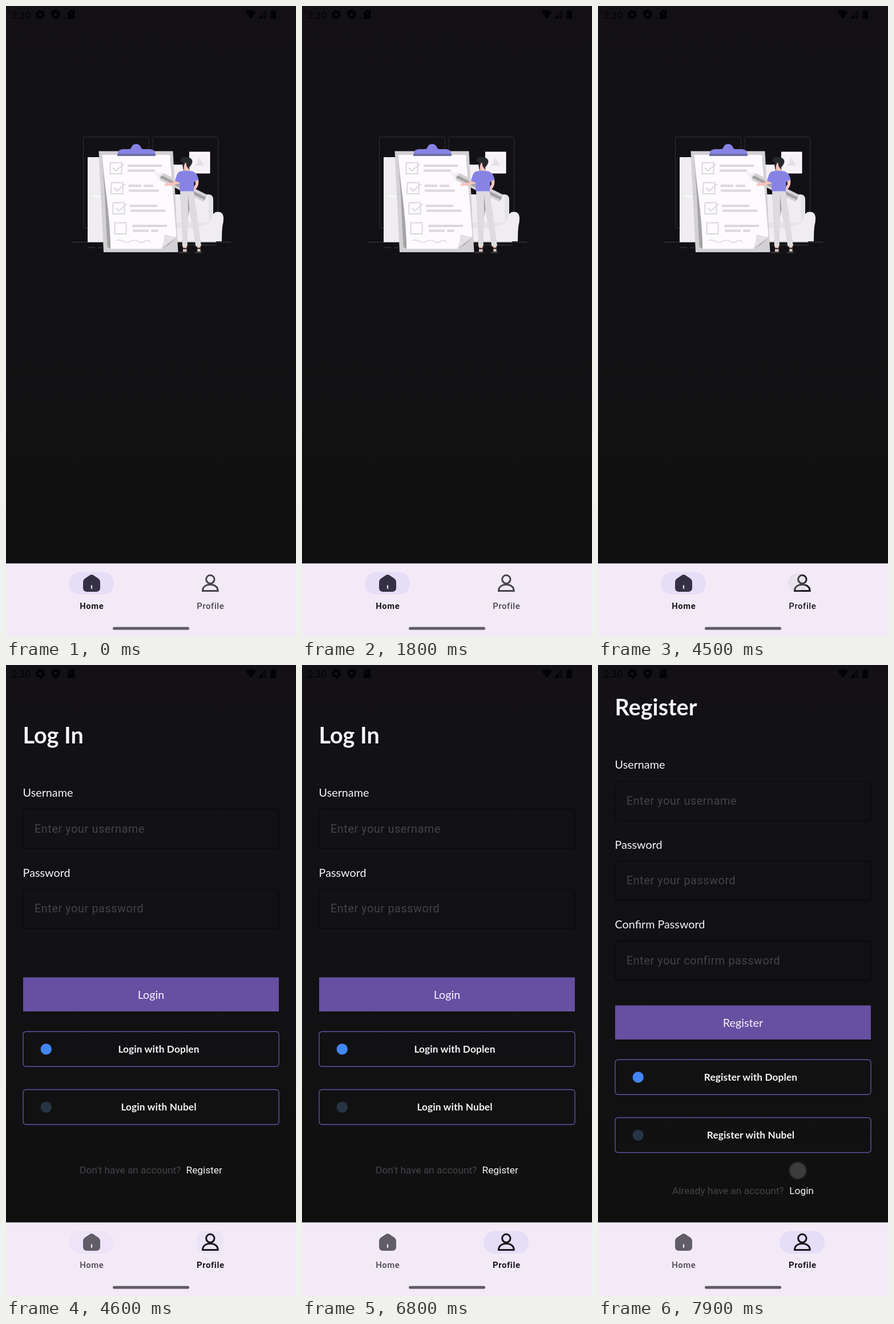
Recreate the animation shown at these times as an HTML page. Size 508 px wide and 1102 px high, loop 8000 ms.

```html
<!DOCTYPE html>
<html lang="en">
<head>
<meta charset="utf-8">
<title>Sign-in flow</title>
<style>
html, body { margin: 0; width: 100%; height: 100%; overflow: hidden; background: #111013; }
svg { display: block; width: 508px; height: 1102px; }
.lato { font-family: Lato, sans-serif; }
.roboto { font-family: Roboto, sans-serif; }
.title { font-size: 39.5px; font-weight: 700; }
.label, .main { font-size: 19.75px; }
.hint { font-size: 19.75px; letter-spacing: .617px; }
.social { font-size: 17.28px; font-weight: 700; letter-spacing: .12px; }
.foot { font-size: 17.28px; }
.tab { font-size: 14.8px; font-weight: 500; letter-spacing: .62px; }
.mid { text-anchor: middle; }
</style>
</head>
<body>
<svg viewBox="0 0 508 1102">
  <defs>
    <linearGradient id="bg" x2="0" y2="1">
      <stop stop-color="#131116"/><stop offset="1" stop-color="#101010"/>
    </linearGradient>
    <radialGradient id="touch">
      <stop offset=".72" stop-color="#c8c8c8" stop-opacity=".53"/>
      <stop offset=".8" stop-color="#a8a5aa" stop-opacity=".5"/>
      <stop offset=".84" stop-color="#8d8894" stop-opacity=".26"/>
      <stop offset="1" stop-color="#8d8894" stop-opacity="0"/>
    </radialGradient>
  </defs>
  <rect width="508" height="1102" fill="url(#bg)"/>

  <g id="home">
    <!-- room -->
    <g fill="none" stroke="#39383a" stroke-width=".8">
      <rect x="135.5" y="228.8" width="115" height="158.5" rx="3"/>
      <rect x="256.8" y="228.8" width="114.7" height="158.5" rx="3"/>
      <path d="M114 412.5H394M143 422H156M161 422H169M304 417.5H367" stroke="#4a494b"/>
    </g>
    <path d="M143 264H172V412.500H143Z" fill="#efedf0"/>
    <path d="M152 332.500H167" stroke="#fff" stroke-width="2"/>
    <path d="M292 277H311V305H292Z" fill="#f3f0f4"/>
    <path d="M321 254.500H357.500V292.500H321Z" fill="#fdf9fd"/>
    <path d="M324 258H354.500V289H324Z" fill="#f6f1f6"/>
    <path d="M339 265L347 279H331Z" fill="#e5e2e5"/>
    <path d="M290 329H354Q363 329 363 338V411H290Z" fill="#e6e4e7"/>
    <path d="M296 329H350Q355 329 355 338V378H296Z" fill="#efedf0"/>
    <path d="M296 388H337V411H296Z" fill="#f0eef1"/>
    <path d="M298 410H368V412.500H298Z" fill="#d9d8da"/>
    <path d="M337 411V389Q337 384 343 383Q360 381 361 369Q362 359.500 371 359.500Q381 359.500 381 371Q381 377 379.500 383Q378 390 378 411Z" fill="#efedf0"/>
    <!-- clipboard -->
    <path d="M162.500 253.500H292.500L301.500 430H171Z" fill="#d2d0d2"/>
    <path d="M168.500 261L173 330L177.500 421L183.500 424L181 360Z" fill="#a5a3a6"/>
    <path d="M168.500 260H287L298.500 403L272 424H183.500Q182 380 176.500 335Q171 295 168.500 260Z" fill="#fdfbfe"/>
    <path d="M298.500 404L272 424L285 417Z" fill="#a9a7aa"/>
    <path d="M277.500 399Q288 402 298.500 403.500L272 424Q277 412 277.500 399Z" fill="#e2e0e3"/>
    <path d="M195 262Q195 250 205 250H215Q219 250 220 246Q222.500 241 228 241Q233.500 241 236 246Q237 250 241 250H252Q262 250 262 262Z" fill="#8683e5"/>
    <path d="M195.200 258H261.800V262H195Z" fill="#716da9"/>
    <g id="list" fill="none" stroke="#dad8db"></g>
    <path d="M193 409.500Q200 407 206 411T218 411T231 411T243 411T254 413" fill="none" stroke="#dedcdf" stroke-width="1.700"/>
    <!-- pencil -->
    <g transform="translate(259 291) rotate(26.500)">
      <path d="M0 0L15 -7V7Z" fill="#f1eff1"/>
      <path d="M15 -7H101V7H15L13 2L15 -2Z" fill="#d4d2d4"/>
      <path d="M14 -2H101V3H14Z" fill="#a3a1a4"/>
    </g>
    <!-- figure -->
    <path d="M299 303L290 309Q283 307 277 311.500L280 314.500L292 313.500L305 309Z" fill="#f5c5bd"/>
    <path d="M331 303L337 303.500Q339 313 331.500 321L328 318L332 311Z" fill="#f5c5bd"/>
    <path d="M310 419H316.500V429H310ZM334.500 418H340.500V429H335.500Z" fill="#f5c5bd"/>
    <path d="M310 422.500H316.500V425H310ZM335 422H341V424.500H335Z" fill="#35363c"/>
    <path d="M302 432Q304 428 310 429H318V432ZM330 432Q332 428 336 429L343 428.500V432Z" fill="#303238"/>
    <path d="M305 322H328.500L342 419L332.500 420L319.500 345L317.500 420H309Z" fill="#dddbde"/>
    <path d="M319.500 330L321.500 355L319 368L318.500 345Z" fill="#aaa8ab"/>
    <path d="M310 273H323L322 290H312Z" fill="#f5c5bd"/>
    <path d="M304 289Q317 286 328 289Q335 292 337.500 303L329.500 307L329 323.500H304.500L304 308L296.500 306Q298 293 304 289Z" fill="#8683e5"/>
    <path d="M306 268Q309 263 316 264Q326 264 326.500 272Q325 279 321 281V286L316.500 280L315 273Q311 276 311.500 287Q308 280 310 273Q306 273 306 268Z" fill="#252a2d"/>
  </g>

  <g id="login"></g>
  <g id="register"></g>

  <!-- status bar -->
  <g fill="#030205">
    <text class="roboto foot" x="9.500" y="21.700">2:30</text>
    <circle cx="60" cy="15" r="4.700" fill="none" stroke="#030205" stroke-width="4"/>
    <circle cx="60" cy="15" r="7.300" fill="none" stroke="#030205" stroke-width="2.800" stroke-dasharray="3.820"/>
    <path fill-rule="evenodd" d="M87 6.500L94.500 9.500V14Q94 20.500 87 23.500Q80 20.500 79.500 14V9.500ZM84.500 11V18.500L91 14.700Z"/>
    <path fill-rule="evenodd" d="M113 7H119Q120.500 7 120.500 8.500V21.500Q120.500 23 119 23H109.500Q108 23 108 21.500V12ZM111.500 11V14H113V11ZM114.500 10V13H116V10Z"/>
    <path d="M419.500 10.500Q429 3.500 438.500 10.500L429 22.500Z"/>
    <path d="M455 8V22H441ZM453.500 11.600L450 15V20.500H453.500Z" fill-rule="evenodd"/>
    <path d="M466 7H470.500V9H472Q473 9 473 10V22Q473 23 472 23H464.500Q463.500 23 463.500 22V10Q463.500 9 464.500 9H466Z"/>
  </g>

  <!-- navigation bar -->
  <rect y="973.500" width="508" height="128.500" fill="#f2ebf7"/>
  <rect class="pill" x="-39.500" y="988.500" width="79" height="39.500" rx="19.750" fill="#e6ddf7"/>
  <rect class="pill" x="-39.500" y="988.500" width="79" height="39.500" rx="19.750" fill="#e6ddf7"/>
  <g id="homeTab">
    <path d="M147 994Q150 992 153 994L162 1000Q165 1002.500 165 1006V1016Q165 1023 158 1023H142Q135 1023 135 1016V1006Q135 1002.500 138 1000Z"/>
    <path d="M150 1012.500V1017" stroke="#f2ebf7" stroke-width="2.200" stroke-linecap="round"/>
    <text class="roboto tab mid" x="150.300" y="1053">Home</text>
  </g>
  <g id="profileTab">
    <g fill="none" stroke="currentColor" stroke-width="3">
      <circle cx="357.800" cy="1001.300" r="7.200"/>
      <path d="M344.500 1021.500C344.500 1014 350.500 1010.500 357.800 1010.500S371.200 1014 371.200 1021.500Z"/>
    </g>
    <text class="roboto tab mid" x="358.300" y="1053" fill="currentColor">Profile</text>
  </g>
  <rect x="187" y="1084.500" width="134" height="5" rx="2.500" fill="#605b64"/>
  <circle id="dot" r="17.500" fill="url(#touch)"/>
</svg>

<script>
const $ = id => document.getElementById(id);
const text = (cls, x, y, s, fill = '#f6f4f7') => `<text class="${cls}" x="${x}" y="${y}" fill="${fill}">${s}</text>`;
const box = (y, h, attrs) => `<rect x="30" y="${y}" width="448" height="${h}" ${attrs}/>`;

const field = (y, name, hint) =>
  text('lato label', 29.6, y, name) +
  box(y + 22, 68.5, 'rx="5" fill="none" stroke="#09080a" stroke-width="1.4"') +
  text('roboto hint', 50, y + 62.7, hint, '#454249');

const social = (y, label, color) =>
  box(y, 61, 'rx="5" fill="none" stroke="#6550a1" stroke-width="1.4"') +
  `<circle cx="70.300" cy="${y + 30.7}" r="9.700" fill="${color}"/>` +
  text('lato social mid', 267.5, y + 36.7, label);

function form(top, title, fields, action, buttonY, foot) {
  return text('lato title', 29.6, top, title) +
    fields.map(([name, hint], i) => field(top + 93.3 + i * 139.6, name, hint)).join('') +
    box(buttonY, 59.5, 'fill="#674fa2"') +
    text('lato main mid', 254, buttonY + 37.3, action) +
    social(buttonY + 94.7, action + ' with Doplen', '#4285f4') +
    social(buttonY + 196, action + ' with Nubel', '#263445') +
    text('roboto foot', foot.x, foot.y, foot.ask, '#454249') +
    text('roboto foot', foot.linkX, foot.y, foot.link);
}

const user = ['Username', 'Enter your username'];
const pass = ['Password', 'Enter your password'];
const confirm = ['Confirm Password', 'Enter your confirm password'];
$('login').innerHTML = form(136.7, 'Log In', [user, pass], 'Login', 545.5,
  { x: 129, y: 888, ask: 'Don’t have an account?', linkX: 315.5, link: 'Register' });
$('register').innerHTML = form(87.8, 'Register', [user, pass, confirm], 'Register', 594.5,
  { x: 130, y: 924.3, ask: 'Already have an account?', linkX: 335.3, link: 'Login' });

// Checklist: box corner, then the dashes of its two lines.
const rows = [
  [182.5, 273.5, 'M213 279H273M213 287.500H261'],
  [184.5, 308.5, 'M214.500 314H237M241 314H258M215 322.500H268'],
  [187.5, 343.5, 'M217 349H265M218 357.500H279'],
  [190.5, 378.5, 'M221 384H282M222 392.500H250M254 392.500H266.500']
];
$('list').innerHTML = rows.map(([x, y, dashes], i) =>
  `<rect x="${x}" y="${y}" width="20" height="19.500" stroke-width="2"/>` +
  (i < 3 ? `<path d="M${x + 5} ${y + 9}l5 5.500L${x + 24} ${y + 2.5}" stroke-width="2.200"/>` : '') +
  `<path d="${dashes}" stroke-width="4"/>`).join('');

const LOOP = 8000, SWITCH = 4600, REGISTER = 7900;
// Taps: place, press, release, end of fade.
const taps = [
  [267, 754, 2300, 2400, 2500],
  [350, 1007, 4300, 4500, 4600],
  [350, 883, 7700, 7900, 8000]
];
const pills = document.querySelectorAll('.pill');
const clamp = v => Math.min(1, Math.max(0, v));
const show = (el, on) => el.setAttribute('visibility', on ? 'visible' : 'hidden');

function setPill(el, x, scale, alpha) {
  el.setAttribute('transform', `translate(${x} 0) scale(${scale} 1)`);
  el.setAttribute('opacity', alpha);
}

function setTab(el, color, iconColor, bold) {
  el.style.color = color;
  el.setAttribute('fill', iconColor);
  const label = el.querySelector('text');
  label.setAttribute('fill', color);
  label.style.fontWeight = bold ? 700 : 500;
}

function draw(t) {
  const onProfile = t >= SWITCH;
  show($('home'), !onProfile);
  show($('login'), onProfile && t < REGISTER);
  show($('register'), t >= REGISTER);

  const since = t - SWITCH + 50;
  const grow = 1 - (1 - clamp(since / 500)) ** 4;
  setPill(pills[0], 149.8, 1, onProfile ? 1 - clamp(since / 100) : 1);
  setPill(pills[1], 357.8, .4 + .6 * grow, onProfile ? clamp(since / 100) : 0);
  setTab($('homeTab'), onProfile ? '#48444e' : '#17151a', onProfile ? '#605c68' : '#343144', !onProfile);
  setTab($('profileTab'), t >= 4400 ? '#17151c' : '#48444e', 'none', onProfile);

  const tap = taps.find(([, , start, , end]) => t >= start && t < end);
  show($('dot'), tap);
  if (tap) {
    $('dot').setAttribute('transform', `translate(${tap[0]} ${tap[1]})`);
    $('dot').setAttribute('opacity', t < tap[3] ? 1 : .45);
  }
}

const start = performance.now();
function tick() {
  draw((performance.now() - start) % LOOP);
  requestAnimationFrame(tick);
}
tick();
</script>
</body>
</html>
```
